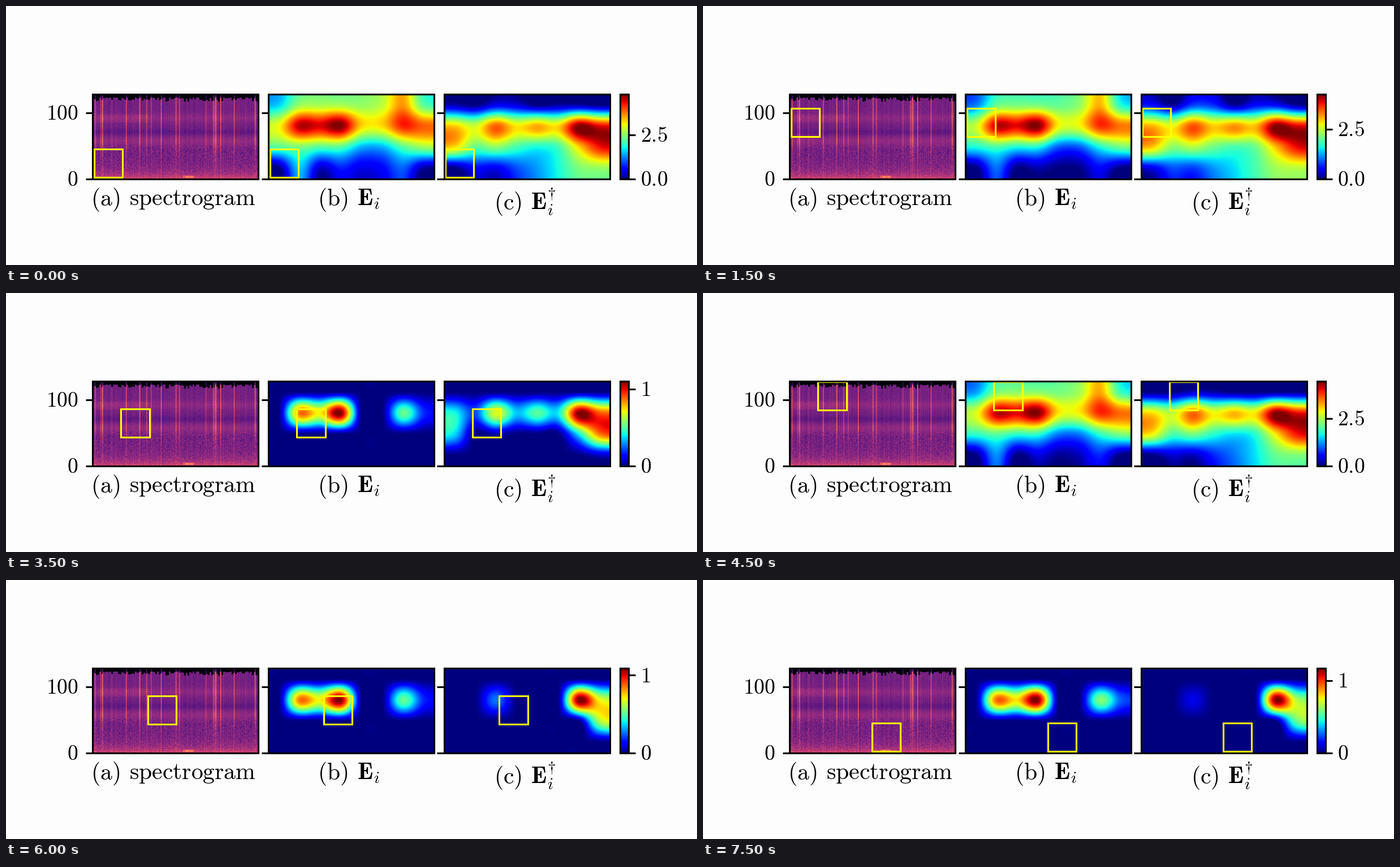
Write a matplotlib script that moves like this. It is 1222 px wide and 458 px high and loops after 8 s.

```python
import numpy as np
import matplotlib.pyplot as plt
from matplotlib.animation import FuncAnimation
from matplotlib.patches import Rectangle

W, H, DPI = 1222, 458, 128
PT = 72 / DPI                      # points per pixel
TOP, BOTTOM = 156, 306
PANELS = (153, 464, 774.5)         # left edges
PANEL_W = 293
LINE = 3.1 * PT
FRAMES, ROWS = 16, 5
PEAK = 4.8                         # highest similarity

plt.rcParams["mathtext.fontset"] = "cm"
fig = plt.figure(figsize=(W / DPI, H / DPI), dpi=DPI, facecolor="#fdfdfd")
ax = fig.add_axes([0, 0, 1, 1])
ax.axis("off")


def image(data, left, width, cmap, smooth):
    return ax.imshow(data, extent=(left, left + width, BOTTOM, TOP), cmap=cmap,
                     vmin=0, vmax=1, aspect="auto", interpolation=smooth)


def outline(left, width):
    ax.add_patch(Rectangle((left, TOP), width, BOTTOM - TOP, fill=False,
                           ec="black", lw=LINE, zorder=5))


def tick(x0, x1, y):
    return ax.plot([x0, x1], [y, y], color="black", lw=LINE, zorder=5,
                   solid_capstyle="butt")[0]


def label(x, y, text, em=37.5, ha="left"):
    return ax.text(x, y, f"${text}$", fontsize=em * PT, ha=ha, va="baseline")


def caption(x, y, letter, gap, name):
    label(x, y, rf"\mathrm{{({letter})}}", 41.67)
    label(x + gap, y, name, 41.67)


def spectrogram():
    rng = np.random.default_rng(4)
    h = BOTTOM - TOP
    y = np.arange(h)[:, None] + 0.5

    # purple body, two brighter bands, a warm glow at low frequencies
    img = .34 + .06 * np.exp(-((y - 42) / 8) ** 2) + .07 * np.exp(-((y - 83) / 9) ** 2)
    img = img - .05 * np.exp(-((y - 67) / 6) ** 2) + .25 * np.exp((y - h) / 12)
    img = img + (.02 + .035 * (y > 90)) * rng.normal(size=(h, PANEL_W))
    img += rng.normal(0, .02, PANEL_W)
    img[36:50, 8:100] += .03
    img[144:148, 160:180] += .18

    ragged = np.repeat(6 + 7 * rng.random(PANEL_W // 3 + 1) ** 2, 3)[:PANEL_W]
    img[y < ragged] = .02

    clicks = [4, 14, 17, 59, 83, 95, 103, 121, 147, 153, 200, 213, 216, 218,
              226, 250, 287]
    fade = np.interp(y[:, 0], [0, 4, 85, 115, h], [.6, 1, .9, .35, .1])
    for col in clicks:
        gain = rng.uniform(.2, .4) * fade
        img[:, col] += gain
        img[:, col + 1] += .4 * gain
    return np.clip(img, 0, 1)


# Similarity to the 4 x 8 patches, relative to PEAK
E = np.array([
    [.33, .53, .55, .55, .53, .58, .75, .46],
    [.64, .95, .92, 1.0, .69, .68, .88, .81],
    [.45, .50, .45, .45, .30, .30, .45, .54],
    [.00, .32, .06, .15, .09, .12, .22, .03]])
E_DAGGER = np.array([
    [.04, -.08, .10, .08, -.08, .03, .03, -.08],
    [.69, .60, .81, .66, .73, .68, 1.0, .91],
    [.67, .47, .52, .43, .38, .43, .68, .89],
    [.00, .12, .10, .20, .28, .38, .50, .53]])


def rectify(grid, floor):
    return np.maximum(grid - floor, 0) / (1 - floor)


def levels(i):
    """Colour-bar maximum and the floor taken off E-dagger."""
    if i in (0, 3, 4, 6, 9, 10, 11):
        keys, tops, floors = [0, 3, 9], [4.8, 4.26, 4.46], [0, -.1, .05]
    else:
        keys, tops, floors = [5, 7, 12, 15], [1.5, 1.1, 1.09, 1.17], [.66, .5, .75, .79]
    return np.interp(i, keys, tops), np.interp(i, keys, floors)


image(spectrogram(), PANELS[0], PANEL_W, "magma", "nearest")
map_b = image(E, PANELS[1], PANEL_W, "jet", "catrom")
map_c = image(E_DAGGER, PANELS[2], PANEL_W, "jet", "catrom")
image(np.linspace(1, 0, 256)[:, None], 1086, 14.5, "jet", "bilinear")
outline(1086, 14.5)

boxes = []
for left in PANELS:
    outline(left, PANEL_W)
    for y in (188.5, 305.5):
        tick(left - 12.5, left, y)
    box = Rectangle((0, 0), 50.3, 49.8, fill=False, ec="#ffff00", lw=LINE, zorder=4)
    boxes.append(ax.add_patch(box))

label(127.5, 201, r"\mathrm{100}", ha="right")
label(127.5, 318.5, r"\mathrm{0}", ha="right")
caption(150, 352.5, "a", 67.5, r"\mathrm{spectrogram}")
caption(551, 352.5, "b", 69.8, r"\mathbf{E}_i")
caption(863, 360, "c", 65, r"\mathbf{E}_i^{\dagger}")

tick(1100, 1112.5, 305.5)
bar_tick = tick(1100, 1112.5, TOP)
zero_text = label(1121.5, 318.5, "0")
bar_text = label(1121.5, 0, "1")

ax.set_xlim(0, W)
ax.set_ylim(H, 0)


def update(i):
    col, row = divmod(i, ROWS)
    for box, left in zip(boxes, PANELS):
        box.set_xy((left + 2.5 + 47.7 * col, 253 - 24 * row))

    top, floor = levels(i)
    map_b.set_data(rectify(E, 1 - top / PEAK))
    map_c.set_data(rectify(E_DAGGER, floor))

    value, zero = (2.5, "0.0") if top > 2.5 else (1, "0")
    y = BOTTOM - (BOTTOM - TOP) * value / top
    bar_tick.set_ydata([y, y])
    bar_text.set_y(y + 12.5)
    bar_text.set_text(rf"$\mathrm{{{value}}}$")
    zero_text.set_text(rf"$\mathrm{{{zero}}}$")
    return [map_b, map_c, bar_tick, bar_text, zero_text, *boxes]


anim = FuncAnimation(fig, update, frames=FRAMES, interval=500,
                     init_func=lambda: [], repeat=True, repeat_delay=0)
plt.show()
```
